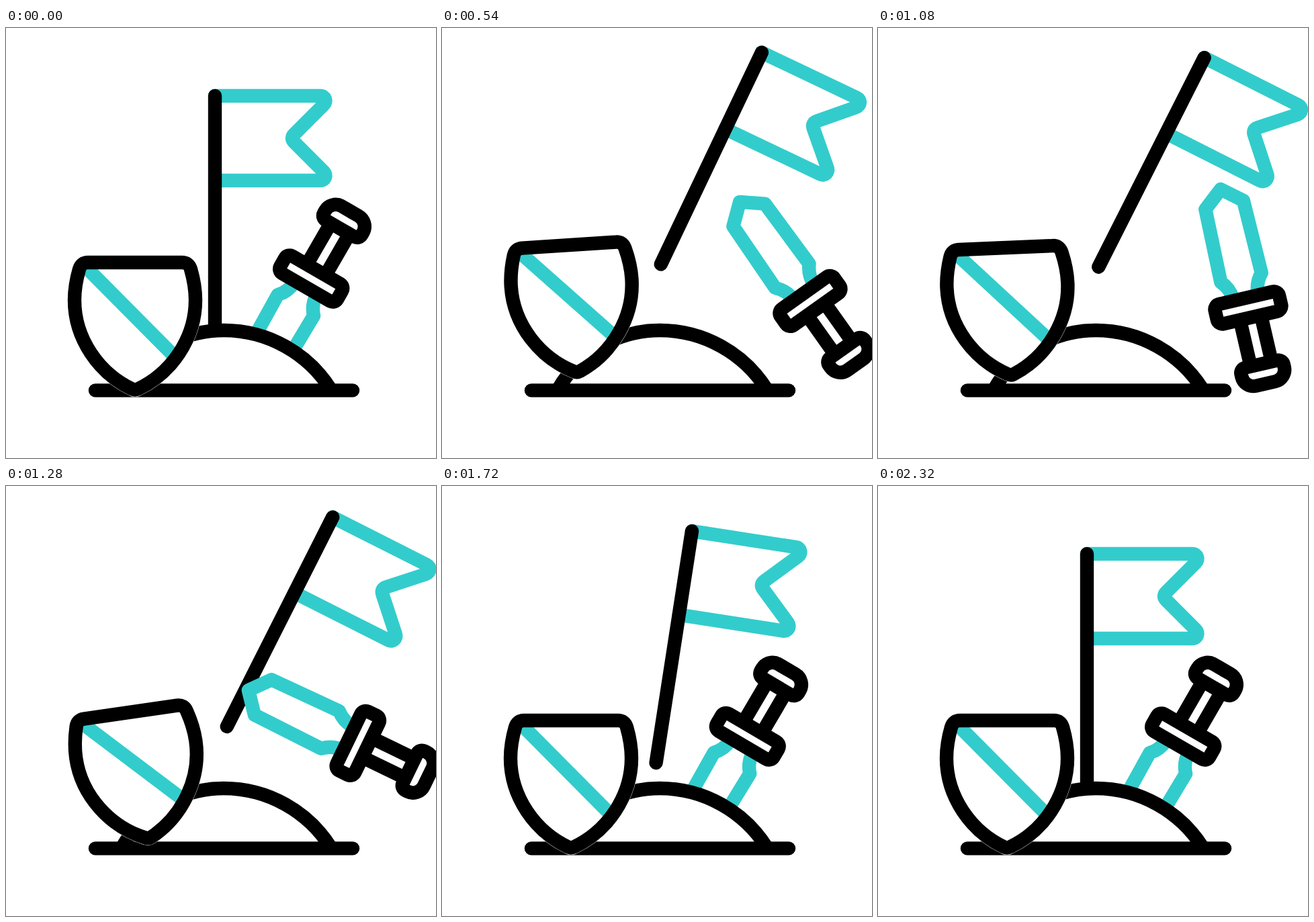
An HTML page that plays this animation: 640x640 px, repeating every 2.4 s.

```html
<!DOCTYPE html>
<html lang="en">
<head>
<meta charset="utf-8">
<title>Flag, sword and shield</title>
<style>
  html, body { margin: 0; width: 100%; height: 100%; overflow: hidden; background: #fff; }
  svg {
    display: block; width: 100%; height: 100%;
    fill: none; stroke: #000; stroke-width: 20.4; stroke-linecap: round; stroke-linejoin: round;
  }
  .teal { stroke: #33cccc; }
  .solid { fill: #fff; }
  .butt { stroke-linecap: butt; }
  .halo { fill: #fff; stroke: #fff; stroke-width: 21.2; }
</style>
</head>
<body>
<svg viewBox="0 0 640 640">
  <defs>
    <path id="outline" d="M-70-56H70Q80-56 83-46C87-32 90-16 90 0C90 57 54 109 4 132.5Q0 134.5-4 132.5C-54 109-90 57-90 0C-90-16-87-32-83-46Q-80-56-70-56Z"/>
  </defs>
  <g id="flag">
    <path class="teal" d="M0-349H157C164-349 167-341 162-336L118-292Q112-286 118-280L162-236C167-231 164-223 157-223H0"/>
    <path d="M0 0V-349"/>
  </g>
  <g id="sword">
    <g transform="translate(0 -50)">
      <path class="teal" d="M-19 18Q-20 34-31 46L-29 157L0 181L29 157L31 46Q20 34 19 18"/>
      <path d="M-16-15V-85M16-15V-85"/>
      <rect class="solid" x="-49" y="-15" width="98" height="30" rx="8"/>
      <path class="solid" d="M-14.5-116H14.5A18 18 0 0 1 32.5-98V-94A8 8 0 0 1 24.5-86H-24.5A8 8 0 0 1-32.5-94V-98A18 18 0 0 1-14.5-116Z"/>
    </g>
  </g>
  <path class="solid butt" d="M172 539A174.3 174.3 0 0 1 324 450A188.3 188.3 0 0 1 484 539"/>
  <path d="M133 539.4H516"/>
  <g id="shield">
    <g transform="translate(0 9)">
      <use href="#outline" class="halo"/>
      <path class="teal butt" d="M-73-49L58 83"/>
      <use href="#outline"/>
    </g>
  </g>
</svg>
<script>
const LOOP = 2400;

// Soft start, then an exponential settle from 0 to 1
const ease = (t, start, tau) => 1 - Math.exp(-((Math.max(0, t - start) / tau) ** 2.2));

// Goes up to 1 and comes back to 0
const pulse = (t, up, upTau, down, downTau) => ease(t, up, upTau) - ease(t, down, downTau);

function place(id, x, y, angle) {
  document.getElementById(id).setAttribute('transform', `translate(${x} ${y}) rotate(${angle})`);
}

function moveFlag(t) {
  const angle = 26.8 * pulse(t, 0, 328, 1512, 199);
  const hoist = pulse(t, 20, 300, 1580, 162);
  const sag = pulse(t, 540, 500, 1700, 150);
  place('flag', 311 + 0.58 * angle + 2.5 * sag, 450 - 102 * hoist + 11 * sag, angle);
}

function moveSword(t) {
  const turn = pulse(t, 186, 271, 1075, 291);
  const reach = pulse(t, 310, 202, 968, 329);
  const lift = pulse(t, 0, 311, 1400, 158);
  place('sword', 429.2 + 121.5 * reach, 416.3 - 55.5 * lift + 10 * reach ** 4, 30 + 137 * turn);
}

// Hops up, then rocks through three half swings before it lands
function moveShield(t) {
  const halfSwing = 435;
  const phase = Math.min(3, Math.max(0, (t - 170) / halfSwing)) * Math.PI;
  const angle = -8.3 * Math.sin(phase) * pulse(t, 0, 250, 1280, 200);
  const lift = 18 * pulse(t, 0, 170, 300, 200) + 22 * pulse(t, 0, 170, 1100, 240);
  place('shield', 192, 396 - lift, angle);
}

function draw() {
  const t = performance.now() % LOOP;
  moveFlag(t);
  moveSword(t);
  moveShield(t);
  requestAnimationFrame(draw);
}
draw();
</script>
</body>
</html>
```
